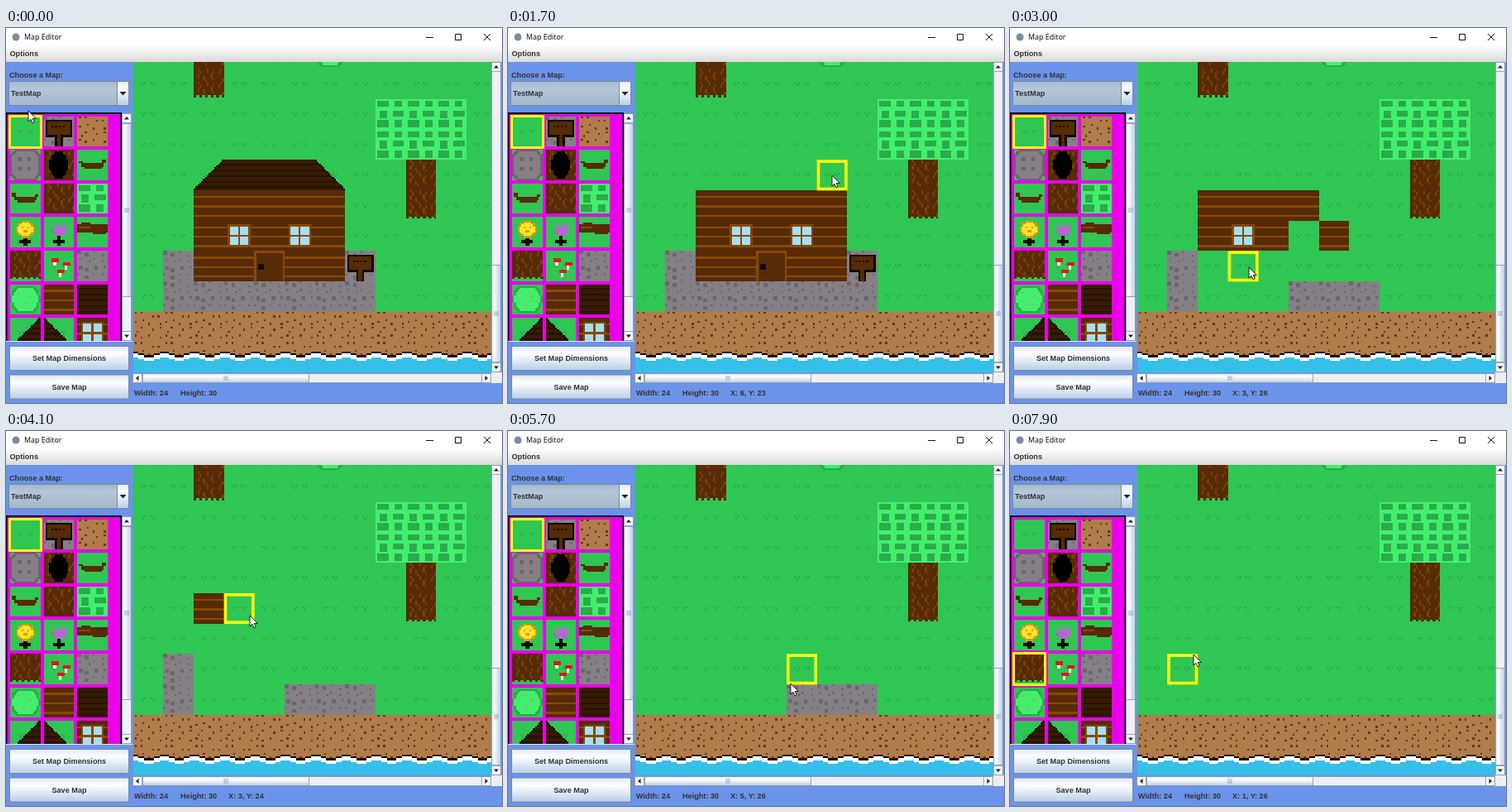
Write an HTML page that moves like this. It is 600 px wide and 453 px high and loops after 8000 ms.

```html
<!DOCTYPE html>
<html lang="en">
<head>
<meta charset="utf-8">
<title>Map Editor</title>
<style>
html, body { margin: 0; width: 100%; height: 100%; overflow: hidden; background: #fff; }
svg { display: block; width: 600px; height: 453px; }
text { font: bold 9.15px "Liberation Sans", Arial, sans-serif; fill: #333; white-space: pre; }
.title { font: 8.9px "Open Sans", sans-serif; fill: #000; }
.px { shape-rendering: crispEdges; }
</style>
</head>
<body>
<svg id="stage" viewBox="0 0 600 453" xmlns="http://www.w3.org/2000/svg">
  <defs id="defs">
    <linearGradient id="down" x2="0" y2="1">
      <stop offset="0" stop-color="#dde8f3"/><stop offset=".3" stop-color="#fff"/>
      <stop offset=".55" stop-color="#e6eef7"/><stop offset="1" stop-color="#b8cfe5"/>
    </linearGradient>
    <linearGradient id="across">
      <stop offset="0" stop-color="#dde8f3"/><stop offset=".3" stop-color="#fff"/>
      <stop offset=".55" stop-color="#e0eaf5"/><stop offset="1" stop-color="#b8cfe5"/>
    </linearGradient>
    <linearGradient id="combo" x2="0" y2="1">
      <stop offset="0" stop-color="#a3b8cc"/><stop offset=".3" stop-color="#b5c6d9"/>
      <stop offset="1" stop-color="#a3b8cc"/>
    </linearGradient>
    <linearGradient id="menu" x2="0" y2="1">
      <stop offset="0" stop-color="#fff"/><stop offset="1" stop-color="#dadada"/>
    </linearGradient>
    <clipPath id="mapClip"><rect x="153" y="41" width="434" height="375"/></clipPath>
    <clipPath id="listClip"><rect x="0" y="102" width="140" height="276"/></clipPath>
  </defs>

  <rect width="600" height="453" fill="#6b93e9"/>
  <rect width="600" height="21" fill="#fff"/>
  <circle cx="12" cy="11" r="4.5" fill="#7a8ba0"/>
  <text class="title" x="22" y="14">Map Editor</text>
  <path d="M508 11.5h9M543.5 7.5h7v7h-7zM578 7l8 8m0-8l-8 8" fill="none" stroke="#111"/>
  <rect y="21" width="600" height="20" fill="url(#menu)"/>
  <text x="4.5" y="34">Options</text>

  <text x="4" y="59.5">Choose a Map:</text>
  <rect x="3.5" y="64.5" width="145" height="29" fill="url(#combo)" stroke="#7a8a99"/>
  <rect x="134.5" y="64.5" width="14" height="29" fill="url(#down)" stroke="#7a8a99"/>
  <path d="M137.5 77h8l-4 4.5z" fill="#222"/>
  <text x="6" y="82">TestMap</text>

  <g id="list" clip-path="url(#listClip)">
    <rect y="102" width="140" height="277"/>
    <rect x="1.5" y="104" width="137" height="275" fill="#ea00ea"/>
  </g>
  <path d="M0 378.5h153" stroke="#dfe6f0"/>
  <g id="bars"></g>
  <g id="buttons"></g>

  <g id="map" clip-path="url(#mapClip)"></g>
  <text x="155" y="444">Width: 24</text>
  <text x="211" y="444">Height: 30</text>
  <text id="coords" x="269" y="444"></text>
  <rect id="pick" x="4.5" width="38" height="38" fill="none" stroke="#ffff08" stroke-width="3" class="px"/>
  <rect id="hover" width="33.4" height="33.4" fill="none" stroke="#ffff08" stroke-width="3.6"/>
  <path id="mouse" d="M0 0V13L3 10.3 5 14.8 7.2 13.8 5.2 9.5H9.2Z" fill="#fff" stroke="#111" stroke-width=".9"/>
</svg>
<script>
const NS = 'http://www.w3.org/2000/svg';
const $ = id => document.getElementById(id);
function add(parent, tag, attrs) {
  const el = document.createElementNS(NS, tag);
  for (const k in attrs) el.setAttribute(k, attrs[k]);
  parent.appendChild(el);
  return el;
}

// Tiles are 16 x 16 units, built as layers of [colour, path].
const box = (x, y, w = 1, h = 1) => `M${x} ${y}h${w}v${h}h${-w}z`;
const each = (n, f) => Array.from({ length: n }, (_, i) => f(i)).join('');
const FULL = box(0, 0, 16, 16);
const GREEN = '#30c654', BROWN = '#572b05', LINE = '#894806', DARK = '#361b02', SEAM = '#271201',
  BLACK = '#100a04', GREY = '#858085', PEBBLE = '#6c676c', LEAF = '#42ef6c', SHADE = '#2bab4b';

function random(seed) {
  return () => (seed = seed * 16807 % 2147483647) / 2147483647;
}
// One jittered dot in each square of an n x n grid
function speckle(n, seed, big) {
  const rnd = random(seed), pitch = 16 / n;
  return each(n * n, i => {
    const size = 1 + (rnd() < big);
    const at = k => Math.floor(k * pitch + rnd() * (pitch - size));
    return box(at(i % n), at(Math.floor(i / n)), size, size);
  });
}
// Filled round shape; a higher power makes it squarer
function blob(rx, ry, cx = 8, cy = 8, power = 2) {
  return each(16, y => {
    const d = Math.abs(y + .5 - cy) / ry;
    const half = d < 1 ? Math.round(rx * (1 - d ** power) ** (1 / power)) : 0;
    return half ? box(cx - half, y, half * 2) : '';
  });
}
const stripes = (first, step) => each(Math.ceil((16 - first) / step), i => box(0, first + i * step, 16));
const tuft = x => box(x, 7) + box(x + 1, 8) + box(x + 2, 7);

const grass = [[GREEN, FULL], ['#2ab14a', tuft(4) + tuft(9)]];
const stone = [[GREY, FULL], [PEBBLE, speckle(4, 77, .5)]];
const sand = [['#b17c4b', FULL], ['#6a3a12', speckle(4, 421, 0)]];
const bark = ['#77400f', each(4, i =>
  each(14, y => (y + i * 3) % 7 < 5 ? box(2 + i * 4 + Math.round(Math.sin(y * .9 + i)), y) : ''))];
const wall = [[BROWN, FULL], [LINE, stripes(3, 5)]];
const stem = [BLACK, box(7, 10, 2, 5) + box(5, 12, 6, 2)];

function bush() {
  const rnd = random(9);
  return each(6, i => {
    const wide = (i + (i >> 1)) % 2, w = wide ? 4 : 6, h = 3 + Math.round(rnd());
    return box(1 + i % 2 * 8 + wide, 1 + (i >> 1) * 5, w, h);
  });
}
function slope(flip) {
  const row = y => box(flip ? 0 : 15 - y, y, y + 1);
  return [...grass, [DARK, each(16, row)], [SEAM, each(5, i => row(i * 3 + 2))],
    ['#180b00', each(16, y => box(flip ? y : 15 - y, y))]];
}
function shore() {
  const top = x => 6 - Math.round(1.2 * Math.cos(x / 8 * Math.PI));
  const layer = (dy, h) => each(16, x => box(x, top(x) + dy, 1, h));
  return [...sand, ['#36bfe9', layer(0, 12)], ['#fff', layer(0, 3)], [BLACK, layer(0, 1)]];
}
const spots = [[4, 4], [10, 6], [7, 10]];
const onSpots = f => spots.map(([x, y]) => f(x, y)).join('');
const corners = (from, step, size) => each(4, i => box(from + i % 2 * step, from + (i >> 1) * step, size, size));
const hull = box(2, 7, 12, 2) + box(4, 9, 9);

const tiles = {
  g: grass, s: stone, d: sand, W: wall, w: shore(), l: slope(false), R: slope(true),
  t: [[BROWN, FULL], bark],
  T: [...grass, [BROWN, box(0, 0, 16, 14) + each(6, i => box(i * 3, 14, 1.5))], bark],
  r: [[DARK, FULL], [SEAM, stripes(2, 3)]],
  b: [[LEAF, FULL], [SHADE, bush()]],
  n: [...wall, [LINE, box(2, 2, 12, 12)], ['#a5dff2', corners(3, 5.5, 4.5)]],
  D: [[LINE, FULL], [BROWN, box(1, 1, 14, 15)], [BLACK, box(2, 7, 3, 3)]],
  S: [...stone, [BLACK, box(1, 2, 14, 9) + box(6, 11, 4, 5)], [BROWN, box(2, 3, 12, 7) + box(7, 10, 2, 6)],
    [BLACK, each(4, i => box(4 + i * 2, 5))]],
  k: [...grass, [PEBBLE, blob(8, 8, 8, 8, 4)], [GREY, blob(7, 7, 8, 8, 4)], [PEBBLE, corners(4, 5, 2)]],
  h: [[BROWN, FULL], bark, ['#000', blob(5, 7.5)]],
  B: [...grass, [BROWN, hull + box(1, 6, 2) + box(13, 5, 2, 2)]],
  c: [...grass, [BROWN, hull + box(1, 5, 2, 2) + box(13, 6, 2)]],
  L: [...grass, [BROWN, box(0, 4, 16, 4) + box(2, 3, 5) + box(8, 8, 7)], [LINE, box(1, 5, 6)]],
  y: [...grass, stem, ['#d69a10', blob(5, 4.5, 8, 6.5)], ['#ffe52b', blob(4, 3.5, 8, 6.5)],
    ['#e09a18', box(6, 5) + box(9, 5) + box(7, 7, 2)]],
  p: [...grass, stem, ['#c65be0', each(7, i => box(5 + i, 4 + i % 2 * 2, 1, 4)) + box(6, 7, 5, 2)]],
  m: [...grass, ['#fff', onSpots((x, y) => box(x + 1, y + 2, 1.5, 2))], ['#e01818', onSpots((x, y) => box(x, y, 4, 2))]],
  o: [...grass, [SHADE, blob(7.6, 7.5, 8, 8, 2.6)], [LEAF, blob(6.6, 6.5, 8, 8, 2.6)],
    ['#e8798a', onSpots((x, y) => box(x, y))]]
};
for (const id in tiles) {
  const g = add($('defs'), 'g', { id: 'tile-' + id, class: 'px' });
  for (const [fill, d] of tiles[id]) add(g, 'path', { fill, d });
}
const put = (parent, id, x, y, size) =>
  add(parent, 'use', { href: '#tile-' + id, transform: `translate(${x} ${y}) scale(${size / 16})` });

// Tile palette
const PITCH = 40.6;
['gSd', 'khB', 'ctb', 'ypL', 'Tms', 'oWr', 'lRn'].forEach((row, r) =>
  [...row].forEach((id, c) => put($('list'), id, 5 + c * PITCH, 106.5 + r * PITCH, 36.7)));

// Map
const SIZE = 36.68, X0 = 153.6, TOP = 19, Y0 = 12.6;
const rows = ['..t...o.....', '..T.........', '........bbb.', '........bbb.', '..lrrrR..t..', '..WWWWW..T..',
  '..WnWnW.....', '.sWWDWWS....', '.sssssss....', 'dddddddddddd', 'wwwwwwwwwwww'];
const cells = {};
rows.forEach((row, r) => [...row].forEach((id, c) => {
  const x = X0 + c * SIZE, y = Y0 + r * SIZE;
  put($('map'), 'g', x, y, SIZE);
  if (id != '.') cells[[c, r + TOP]] = { el: put($('map'), id, x, y, SIZE), gone: Infinity };
}));

// Scroll bars
function bar(x, y, length, from, to, upright) {
  const W = 12, g = $('bars');
  const rect = (a, n, fill) => add(g, 'rect', {
    x: (upright ? x : a) + .5, y: (upright ? a : y) + .5, fill, stroke: '#8295ab', 'stroke-width': .8,
    width: upright ? W - 1 : n - 1, height: upright ? n - 1 : W - 1
  });
  const start = upright ? y : x, end = start + length;
  rect(start, length, '#eef0f3');
  rect(start, W, '#f4f6f8');
  rect(end - W, W, '#f4f6f8');
  rect(from, to - from, `url(#${upright ? 'across' : 'down'})`);
  for (const [mid, s] of [[start + 6, -1], [end - 6, 1]])
    add(g, 'path', { fill: '#222', d: upright
      ? `M${x + 3} ${mid - s * 1.5}h6l-3 ${s * 3.5}z` : `M${mid - s * 1.5} ${y + 3}v6l${s * 3.5}-3z` });
  for (let i = -1; i < 2; i++) {
    const m = Math.round((from + to) / 2) + i * 2;
    add(g, 'path', { stroke: '#7f9bbd', 'stroke-width': .8,
      d: upright ? `M${x + 3} ${m}h6` : `M${m} ${y + 3}v6` });
  }
}
add($('bars'), 'rect', { x: 587, y: 416, width: 13, height: 13, fill: '#eee' });
bar(140, 103, 275, 115, 325, true);
bar(587, 41, 375, 286, 404, true);
bar(153, 417, 434, 165, 367, false);

[['Set Map Dimensions', 384], ['Save Map', 418.5]].forEach(([label, y]) => {
  add($('buttons'), 'rect', { x: 4.5, y: y + .5, width: 144, height: 29, fill: 'url(#down)', stroke: '#7a8a99' });
  add($('buttons'), 'text', { x: 76.5, y: y + 18.3, 'text-anchor': 'middle' }).textContent = label;
});

// Pointer stops: time, x, y
const stops = [
  [0, 27, 100], [400, 24, 122], [700, 24, 122],
  [1100, 213, 177], [1700, 392, 178], [1900, 415, 215], [2150, 428, 288],            // roof, sign
  [2300, 387, 290], [2500, 355, 255], [2700, 318, 324], [2850, 240, 308], [3000, 289, 289], // ground floor
  [3200, 245, 250], [3500, 392, 250], [3700, 385, 214], [4100, 295, 223], [4350, 240, 218], // upper walls
  [4600, 208, 288], [4800, 208, 325], [5300, 320, 300], [5700, 342, 305], [6200, 428, 324], // paving
  [6900, 340, 290], [7600, 28, 285], [7800, 29, 283], [7900, 222, 270], [8000, 222, 270]
];
const LOOP = 8000, STEP = 100, PICK = 7600;
const pressed = t => (t >= 1100 && t <= 4850) || (t >= 5700 && t <= 6300);

function pointer(t) {
  const i = stops.findIndex(s => s[0] > t);
  const [a, ax, ay] = stops[i - 1], [b, bx, by] = stops[i];
  const k = (t - a) / (b - a);
  return { x: ax + (bx - ax) * k, y: ay + (by - ay) * k };
}
const cellAt = p => [Math.floor((p.x - X0) / SIZE), TOP + Math.floor((p.y - Y0) / SIZE)];

// Dragging paints grass: note when each cell is first crossed.
for (let t = 0; t < LOOP; t += 5) {
  const cell = cells[cellAt(pointer(t))];
  if (cell && pressed(t)) cell.gone = Math.min(cell.gone, t);
}

function render(time) {
  const t = Math.floor(time % LOOP / STEP) * STEP;
  const p = pointer(t), inMap = p.x > X0 && p.y > 41;
  const [cx, cy] = cellAt(p);
  for (const key in cells) cells[key].el.style.display = t >= cells[key].gone ? 'none' : '';
  $('mouse').setAttribute('transform', `translate(${p.x} ${p.y})`);
  $('hover').style.display = inMap ? '' : 'none';
  $('hover').setAttribute('x', X0 + cx * SIZE + 1.8);
  $('hover').setAttribute('y', Y0 + (cy - TOP) * SIZE + 1.8);
  $('coords').textContent = inMap ? `X: ${cx}, Y: ${cy}` : '';
  $('pick').setAttribute('y', 106 + (t >= PICK ? 4 * PITCH : 0));
}

const begin = performance.now();
function tick() {
  render(performance.now() - begin);
  requestAnimationFrame(tick);
}
tick();
</script>
</body>
</html>
```
